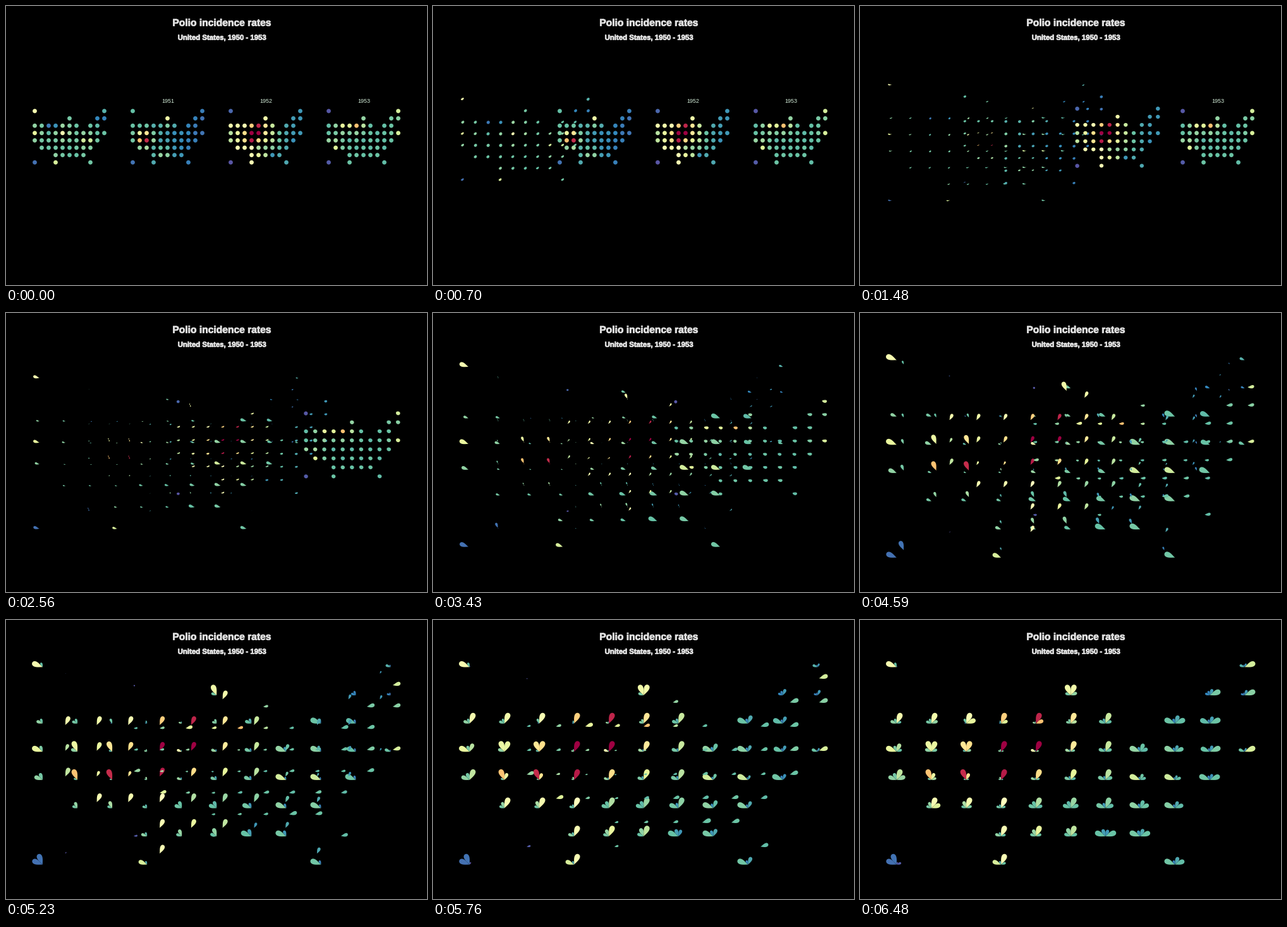
These frames come from a looping animation (666x441 px, 7.58 s). A matplotlib script:

```python
import numpy as np
import matplotlib.pyplot as plt
from matplotlib import patheffects
from matplotlib.animation import FuncAnimation
from matplotlib.collections import PolyCollection

WIDTH, HEIGHT = 666, 441
LOOP_MS, INTERVAL_MS = 7580, 20
TWEEN_STEPS, STAGGER = 25, 5
DOT_RADIUS, PETAL_LENGTH = 3.4, 18
YEARS = (1950, 1951, 1952, 1953)

# Columns occupied by states in each row of the tile map, north to south.
GRID = [(0, 10), (5, 9, 10), (*range(7), 8, 9), range(11),
        range(10), range(1, 9), range(3, 8), (0, 3, 8)]
cols, rows = np.array([(c, r) for r, row in enumerate(GRID) for c in row]).T
rng = np.random.default_rng(4)


def incidence(background, *outbreaks):
    """Background rate plus round bumps given as (column, row, height)."""
    rate = background + rng.uniform(-0.015, 0.015, cols.size)
    for c, r, height in outbreaks:
        rate = rate + height * np.exp(-((cols - c) ** 2 + (rows - r) ** 2) / 0.81)
    return np.clip(rate, 0.015, 1)


west = 1 / (1 + np.exp((cols - 6.3) / 0.6))
rates = np.array([
    incidence(0.21, (0, 0, 0.24), (0, 3, 0.19), (4, 3, 0.27), (7.5, 4, 0.2),
              (9.6, 1, -0.15), (2.5, 2, -0.17), (0, 7, -0.16), (3, 7, 0.17)),
    incidence(0.21 - 0.014 * cols, (1.7, 3.75, 0.9), (5, 1, 0.3),
              (4.5, 5.8, 0.17), (0, 7, -0.15)),
    incidence(0.13 + 0.33 * west, (4, 2.5, 0.65), (3, 3.5, 0.65), (0, 0, -0.42),
              (0, 3.5, -0.17), (4.5, 5, -0.2), (6, 6, -0.2), (0, 7, -0.45)),
    incidence(0.2, (2, 2, 0.2), (4, 1.7, 0.5), (0.7, 4.8, 0.24), (10, 0, 0.16),
              (10, 3, 0.17), (0, 0, -0.18), (0, 7, -0.18)),
])
share = rates / rates.max(axis=0)

theta = np.linspace(0, 2 * np.pi, 48, endpoint=False)


def dot_outline():
    """Circle whose first point faces up and slightly left."""
    turn = theta + np.radians(112.5)
    return DOT_RADIUS * np.column_stack([np.cos(turn), -np.sin(turn)])


def petal_outline(angle):
    """Teardrop that starts at its tip on the origin; y points down."""
    along = (1 - np.cos(theta)) / 2
    across = -0.34 * np.sin(theta) * np.sin(theta / 2) ** 1.5
    c, s = np.cos(angle), np.sin(angle)
    x, y = along * c - across * s, along * s + across * c
    return PETAL_LENGTH * np.column_stack([x, -y])


def place(x0, dx, y0, dy):
    return np.column_stack([x0 + dx * cols, y0 + dy * rows])


def year_shapes(k):
    """Dots in the year's small map, and its petals in the large map."""
    dots = place(45 + 155 * k, 11, 165.5, 11.6)[:, None] + dot_outline()
    petal = petal_outline(np.radians(157.5 - 45 * k))
    petals = place(57.5, 55.05, 74, 44.6)[:, None] + share[k][:, None, None] * petal
    return dots, petals


shapes = [year_shapes(k) for k in range(len(YEARS))]

# The tween advances one step at a time, at a slightly uneven pace.
PACE = [(0, 0), (70, 1), (1010, 8), (1480, 11), (2560, 17),
        (3430, 22), (4590, 28), (5230, 32), (6480, 40)]
step_times, steps = zip(*PACE)

fig = plt.figure(figsize=(WIDTH / 72, HEIGHT / 72), dpi=72, facecolor="black")
ax = fig.add_axes([0, 0, 1, 1])
ax.set(xlim=(-0.5, WIDTH - 0.5), ylim=(HEIGHT - 0.5, -0.5))
ax.axis("off")


def write(x, y, text, size, color="#dedede", **style):
    return ax.text(x, y, text, size=size, color=color, family="Liberation Sans",
                   ha="center", va="center_baseline", **style)


heavy = dict(weight="bold", path_effects=[
    patheffects.withStroke(linewidth=0.8, foreground="#dedede")])
write(341, 25, "Polio incidence rates", 15.6, **heavy)
write(341.5, 49, "United States, 1950 - 1953", 11.4, **heavy)
labels = [write(100.5 + 155 * k, 149, str(year), 9, "#cfe8d4")
          for k, year in enumerate(YEARS)]

marks = PolyCollection(np.concatenate([dots for dots, _ in shapes]),
                       facecolors=plt.get_cmap("Spectral_r")(rates.ravel()),
                       edgecolors="none", linewidths=0)
ax.add_collection(marks, autolim=False)


def update(frame):
    now = (frame + 0.5) * INTERVAL_MS
    step = int(np.interp(now, step_times, steps) + 1e-6)
    outlines = []
    for k, (dots, petals) in enumerate(shapes):
        start = STAGGER * k
        p = np.clip((step - start) / TWEEN_STEPS, 0, 1)
        outlines.append((1 - p) * dots + p * petals)
        labels[k].set_visible(step < start)
    marks.set_verts(np.concatenate(outlines))
    return [marks, *labels]


anim = FuncAnimation(fig, update, frames=LOOP_MS // INTERVAL_MS,
                     interval=INTERVAL_MS, repeat=True, repeat_delay=0, blit=False)
plt.show()
```
